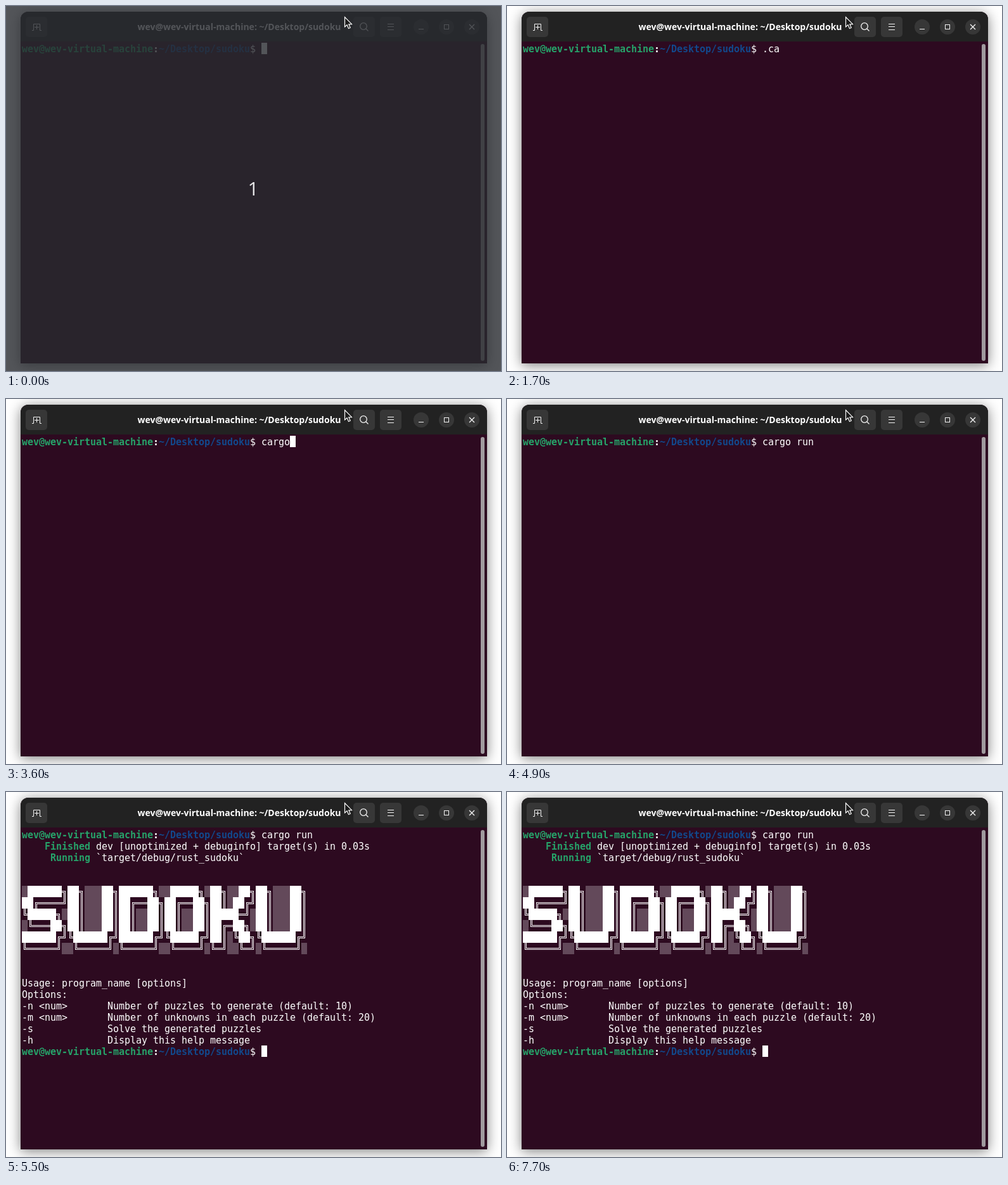
An HTML page with a canvas for the animation above (8 s loop, 781 by 576 pixels).

```html
<!DOCTYPE html>
<html lang="en">
<head>
<meta charset="utf-8">
<title>Terminal</title>
<style>
  html, body { margin: 0; width: 100%; height: 100%; overflow: hidden; background: #fff; }
  canvas { display: block; }
</style>
</head>
<body>
<canvas id="stage" width="781" height="576"></canvas>
<script>
const ctx = document.getElementById('stage').getContext('2d');
const W = 781, H = 576, LOOP = 8000;
const WIN = { x: 23, y: 9, w: 736, h: 555 };
const CELL = { x: 25, y: 58, w: 9, h: 18, base: 15 };
const BG = '#2d0a20', WHITE = '#fff', GREEN = '#26a269', BLUE = '#12488b';
const HOST = 'wev@wev-virtual-machine', PATH = '~/Desktop/sudoku';
const INPUT_COL = 42, END_ROW = 19;

// Typed command and cursor visibility from each time on
const TYPING = [
  [0, '', 1], [800, '', 0], [1100, '.ca', 1], [1700, '.ca', 0], [1800, '.ca', 1],
  [1900, '.c', 1], [2200, '.', 1], [2300, '', 1], [3600, 'cargo', 1], [3700, 'cargo ', 1],
  [4000, 'cargo r', 1], [4100, 'cargo ru', 1], [4400, 'cargo run', 1], [4900, 'cargo run', 0]
];
const ENTER = 5300, BUILT = 5400, DONE = 5500;
const BLINK = [[DONE, 1], [5900, 0], [6600, 1], [7100, 0], [7700, 1]];

const BANNER = [
  '░██████╗██╗░░░██╗██████╗░░█████╗░██╗░░██╗██╗░░░██╗',
  '██╔════╝██║░░░██║██╔══██╗██╔══██╗██║░██╔╝██║░░░██║',
  '╚█████╗░██║░░░██║██║░░██║██║░░██║█████═╝░██║░░░██║',
  '░╚═══██╗██║░░░██║██║░░██║██║░░██║██╔═██╗░██║░░░██║',
  '██████╔╝╚██████╔╝██████╔╝╚█████╔╝██║░╚██╗╚██████╔╝',
  '╚═════╝░░╚═════╝░╚═════╝░░╚════╝░╚═╝░░╚═╝░╚═════╝░'
];
const HELP = [
  'Usage: program_name [options]',
  'Options:',
  '-n <num>       Number of puzzles to generate (default: 10)',
  '-m <num>       Number of unknowns in each puzzle (default: 20)',
  '-s             Solve the generated puzzles',
  '-h             Display this help message'
];
// Horizontal and vertical directions of each corner's arms
const CORNERS = { '╔': [1, 1], '╗': [-1, 1], '╚': [1, -1], '╝': [-1, -1] };

const at = (steps, t) => steps.filter(s => s[0] <= t).pop();

function rect(x, y, w, h, color) {
  ctx.fillStyle = color;
  ctx.fillRect(x, y, w, h);
}

function rounded(x, y, w, h, r, color) {
  ctx.fillStyle = color;
  ctx.beginPath();
  ctx.roundRect(x, y, w, h, r);
  ctx.fill();
}

function disc(x, y, r, color) {
  ctx.fillStyle = color;
  ctx.beginPath();
  ctx.arc(x, y, r, 0, Math.PI * 2);
  ctx.fill();
}

function lines(...paths) {
  ctx.beginPath();
  for (const p of paths) p.forEach(([x, y], i) => i ? ctx.lineTo(x, y) : ctx.moveTo(x, y));
  ctx.stroke();
}

function label(text, x, y, font, color) {
  ctx.font = font;
  ctx.fillStyle = color;
  ctx.textAlign = 'center';
  ctx.fillText(text, x, y);
}

function drawCorner(x, y, [h, v]) {
  for (const s of [-1, 1]) {
    const cx = x + 4 + s * h, cy = y + 9 + s * v;
    const ex = h > 0 ? x + CELL.w : x, ey = v > 0 ? y + CELL.h : y;
    ctx.fillRect(Math.min(cx, ex), cy, Math.abs(ex - cx) + (h < 0 ? 1 : 0), 1);
    ctx.fillRect(cx, Math.min(cy, ey), 1, Math.abs(ey - cy) + (v < 0 ? 1 : 0));
  }
}

function drawCell(ch, x, y) {
  if (ch === ' ') return;
  if (ch === '█') ctx.fillRect(x, y, CELL.w, CELL.h);
  else if (ch === '░') {
    rect(x, y, CELL.w, CELL.h, 'rgba(255,255,255,.26)');
    ctx.fillStyle = WHITE;
  } else if (ch === '═') {
    for (const d of [8, 10]) ctx.fillRect(x, y + d, CELL.w, 1);
  } else if (ch === '║') {
    for (const d of [3, 5]) ctx.fillRect(x + d, y, 1, CELL.h);
  } else if (CORNERS[ch]) drawCorner(x, y, CORNERS[ch]);
  else ctx.fillText(ch, x, y + CELL.base);
}

function print(text, col, row, color = WHITE, bold = false) {
  ctx.font = `${bold ? 'bold ' : ''}15px "DejaVu Sans Mono", monospace`;
  ctx.textAlign = 'left';
  ctx.fillStyle = color;
  [...text].forEach((ch, i) => drawCell(ch, CELL.x + (col + i) * CELL.w, CELL.y + row * CELL.h));
}

function cursor(col, row) {
  rect(CELL.x + col * CELL.w, CELL.y + row * CELL.h, CELL.w, CELL.h, WHITE);
}

function prompt(row) {
  print(HOST, 0, row, GREEN, true);
  print(':', 23, row, WHITE, true);
  print(PATH, 24, row, BLUE, true);
  print('$', 40, row);
}

function drawWindow() {
  const { x, y, w, h } = WIN;
  rect(0, 0, W, H, WHITE);
  ctx.save();
  ctx.shadowColor = 'rgba(0,0,0,.5)';
  ctx.shadowBlur = 20;
  ctx.shadowOffsetY = 3;
  rounded(x, y, w, h, [12, 12, 0, 0], BG);
  ctx.restore();
  rounded(x, y, w, 47, [12, 12, 0, 0], '#222222');
  rounded(749, 60, 6, 500, 3, '#a09a9e');
}

function drawTitleBar() {
  label(`${HOST}: ${PATH}`, 368, 38, 'bold 14px "Open Sans", sans-serif', WHITE);
  for (const x of [31, 548, 590]) rounded(x, 17, 34, 32, 5, '#373737');
  for (const x of [655, 695, 735]) disc(x, 33, 12, '#373737');

  ctx.strokeStyle = '#f4f4f4';
  ctx.lineWidth = 1;
  lines([[41, 38.5], [43.5, 38.5], [43.5, 28.5], [53.5, 28.5], [53.5, 38.5], [56, 38.5]],
    [[45, 33.5], [52, 33.5]], [[48.5, 30], [48.5, 37]]);
  lines(...[28.5, 32.5, 37.5].map(y => [[602, y], [612, y]]));
  lines([[651, 36.5], [659, 36.5]]);
  ctx.strokeRect(691.5, 29.5, 7, 7);
  ctx.lineWidth = 1.3;
  lines([[731, 29], [739, 37]], [[739, 29], [731, 37]], [[568, 36], [571.5, 39.5]]);
  ctx.beginPath();
  ctx.arc(564, 32, 5.3, 0, Math.PI * 2);
  ctx.stroke();
}

function drawPointer() {
  const tip = [[534.5, 17.5], [534.5, 33], [538, 29.8], [540.5, 35.5],
    [543.2, 34.3], [540.8, 28.8], [545.5, 28.6]];
  ctx.beginPath();
  tip.forEach(p => ctx.lineTo(...p));
  ctx.closePath();
  ctx.fillStyle = '#1c1c1c';
  ctx.fill();
  ctx.strokeStyle = WHITE;
  ctx.lineWidth = 1.2;
  ctx.stroke();
}

function drawTerminal(t) {
  const [, typed, on] = at(TYPING, t);
  prompt(0);
  print(typed, INPUT_COL, 0);
  if (t < ENTER) {
    if (on) cursor(INPUT_COL + typed.length, 0);
    return;
  }
  if (t < BUILT) return cursor(0, 1);

  print('Finished', 4, 1, GREEN, true);
  print('dev [unoptimized + debuginfo] target(s) in 0.03s', 13, 1);
  print('Running', 5, 2, GREEN, true);
  print('`target/debug/rust_sudoku`', 13, 2);
  if (t < DONE) return cursor(0, 3);

  BANNER.forEach((line, i) => print(line, 0, 5 + i));
  HELP.forEach((line, i) => print(line, 0, 13 + i));
  prompt(END_ROW);
  if (at(BLINK, t)[1]) cursor(INPUT_COL, END_ROW);
}

function draw(t) {
  drawWindow();
  drawTitleBar();
  drawTerminal(t);
  if (t < 100) {
    rect(0, 0, W, H, 'rgba(41,43,48,.8)');
    label('1', 390, 299, '30px "Open Sans", sans-serif', '#e6e6e8');
  }
  drawPointer();
}

const start = performance.now();
function tick() {
  draw((performance.now() - start) % LOOP);
  requestAnimationFrame(tick);
}
tick();
</script>
</body>
</html>
```
